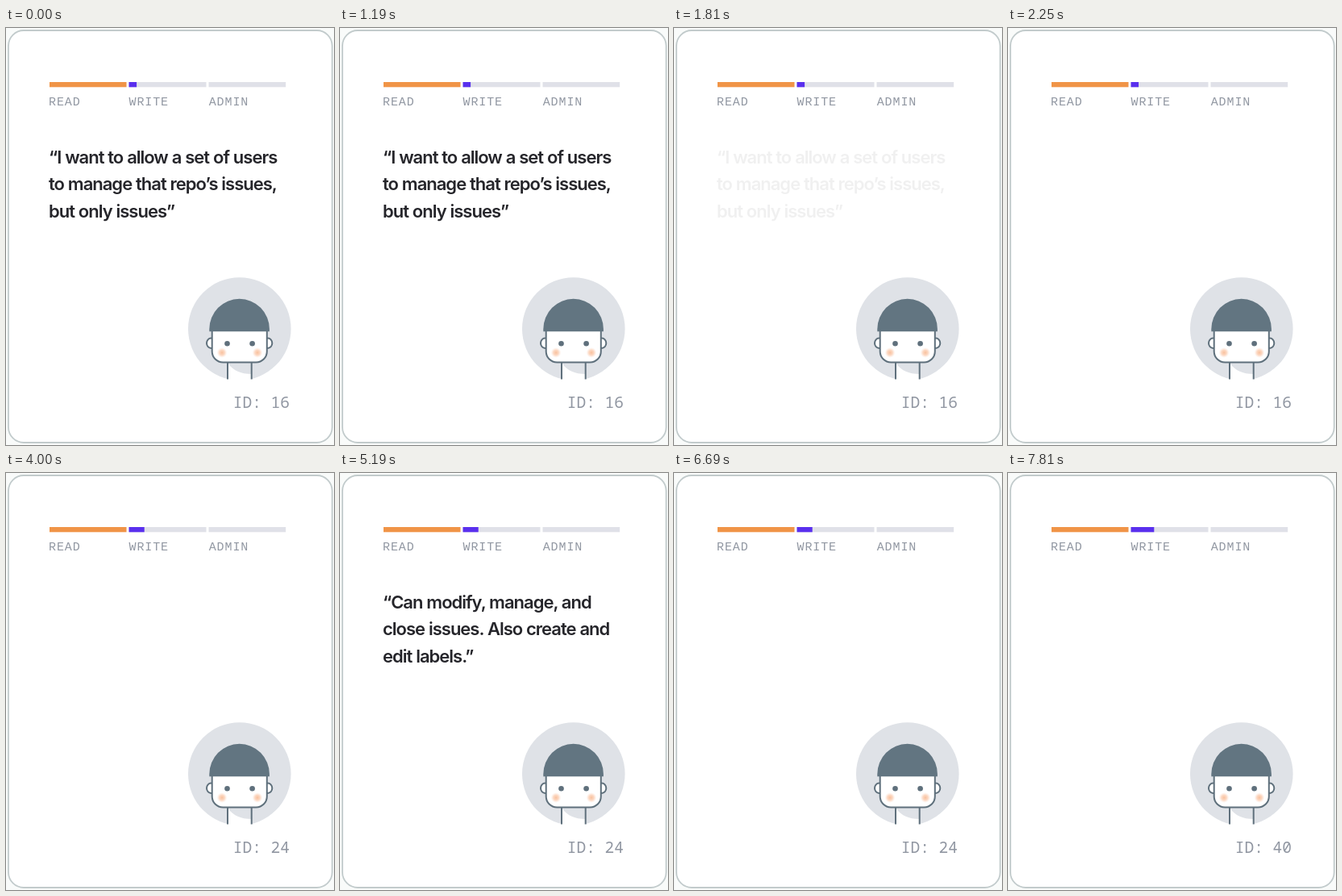
An HTML page for the animation above (8000 ms loop, 407x517 px).

```html
<!DOCTYPE html>
<html lang="en">
<head>
<meta charset="utf-8">
<title>Permission card</title>
<style>
  html, body { margin: 0; width: 100%; height: 100%; overflow: hidden; background: #f9fbfa; }
  svg { display: block; width: 407px; height: 517px; }
  .quote { font: 600 22px Inter, sans-serif; letter-spacing: -1px; word-spacing: .35px; font-optical-sizing: none; fill: #25252a; }
  .mono { fill: #9197a2; }
  .label { font: 15px "Liberation Mono", monospace; letter-spacing: .9px; }
  .id { font: 300 19.5px "Noto Sans Mono", monospace; white-space: pre; }
  .line { stroke: #5f707c; stroke-width: 2; fill: #fff; }
</style>
</head>
<body>
<svg viewBox="0 0 407 517">
  <defs>
    <radialGradient id="blush">
      <stop offset="0" stop-color="#f9c09c"/>
      <stop offset=".5" stop-color="#fbcfb4" stop-opacity=".8"/>
      <stop offset="1" stop-color="#fde3d5" stop-opacity="0"/>
    </radialGradient>
  </defs>
  <rect x="3" y="3" width="401.7" height="511" rx="19" fill="#fff" stroke="#c2cbcc" stroke-width="1.8"/>

  <g fill="#e0e1e8">
    <rect x="54" y="67" width="95.5" height="6.3" fill="#f09447"/>
    <rect x="152.5" y="67" width="96" height="6.3"/>
    <rect x="251.5" y="67" width="95.7" height="6.3"/>
    <rect id="progress" x="152.5" y="67" height="6.3" fill="#5a30ee"/>
  </g>
  <g class="mono label">
    <text x="53" y="96">READ</text>
    <text x="152.5" y="96">WRITE</text>
    <text x="251.7" y="96">ADMIN</text>
  </g>

  <g class="quote" id="request">
    <text x="53" y="167.5">“I want to allow a set of users</text>
    <text x="53" y="201">to manage that repo’s issues,</text>
    <text x="53" y="234.5">but only issues”</text>
  </g>
  <g class="quote" id="answer">
    <text x="53" y="167.5">“Can modify, manage, and</text>
    <text x="53" y="201">close issues. Also create and</text>
    <text x="53" y="234.5">edit labels.”</text>
  </g>

  <!-- avatar -->
  <circle cx="289.8" cy="373" r="63.8" fill="#dfe2e7"/>
  <path d="M275 414H305V437H275Z" fill="#fff"/>
  <path d="M275 415Q284 429 305 429V415Z" fill="#dfe2e7"/>
  <path class="line" d="M275 414V435.5M304.7 414V435.5"/>
  <ellipse class="line" cx="254.5" cy="390.8" rx="5.5" ry="6.2"/>
  <ellipse class="line" cx="324.8" cy="390.8" rx="5.5" ry="6.2"/>
  <path class="line" d="M255.7 374H323.8V401a13.5 13.5 0 0 1-13.5 13.5H269.2a13.5 13.5 0 0 1-13.5-13.5Z"/>
  <path d="M252.3 376.2V373.2a37.3 37.4 0 0 1 74.6 0V376.2Z" fill="#627581"/>
  <g fill="#5f707c">
    <circle cx="274.5" cy="391.3" r="3.3"/>
    <circle cx="305.6" cy="391.3" r="3.3"/>
  </g>
  <g fill="url(#blush)">
    <circle cx="268" cy="402.5" r="6.5"/>
    <circle cx="312" cy="402.5" r="6.5"/>
  </g>
  <text class="mono id" id="count" x="281.8" y="470.7"></text>
</svg>
<script>
  const LOOP = 8000, STEP = 62.5, SPAN = 4;
  const byId = id => document.getElementById(id);
  const [progress, request, answer, count] = ["progress", "request", "answer", "count"].map(byId);

  // Ease-out from 0 to 1 over SPAN steps.
  function ease(step, start) {
    const p = Math.min(1, Math.max(0, (step - start) / SPAN));
    return 1 - (1 - p) ** 2;
  }

  function draw(now) {
    // The motion advances at 16 steps per second.
    const step = Math.floor((now % LOOP + 3) / STEP);
    const first = ease(step, 50), second = ease(step, 121);
    request.setAttribute("opacity", 1 - ease(step, 26));
    answer.setAttribute("opacity", ease(step, 64) - ease(step, 97));
    progress.setAttribute("width", 9.6 * (1 + first + second));
    count.textContent = "ID: " + Math.round(16 + 8 * first + 16 * second);
  }

  const begin = performance.now();
  function tick() {
    draw(performance.now() - begin);
    requestAnimationFrame(tick);
  }
  tick();
</script>
</body>
</html>
```
